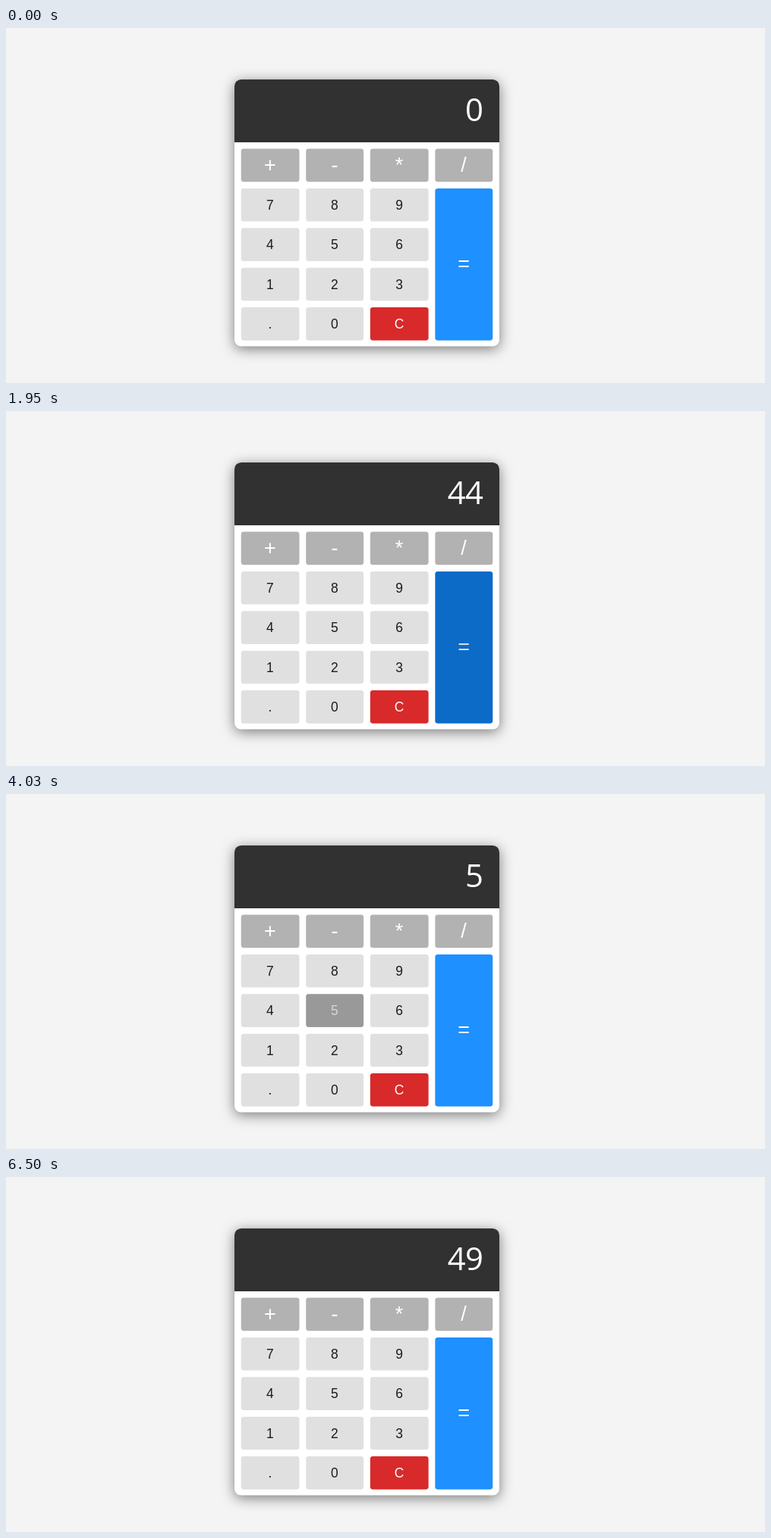
An HTML page that plays this animation: 1000x469 px, repeating every 8 s.

```html
<!DOCTYPE html>
<html lang="en">
<head>
<meta charset="utf-8">
<title>Calculator</title>
<style>
html, body { margin: 0; width: 100%; height: 100%; overflow: hidden; background: #f4f4f4; }
.calc {
  position: absolute; left: 301px; top: 68px; width: 400px; height: 404px;
  transform: scale(.8725); transform-origin: 0 0;
  background: #fff; border-radius: 10px;
  box-shadow: 0 4px 20px rgba(0, 0, 0, .5);
}
.screen {
  box-sizing: border-box; height: 95px; padding-right: 25px;
  background: #313131; color: #fff; border-radius: 10px 10px 0 0;
  font: 48px/90px "Open Sans", "Noto Sans", sans-serif;
  letter-spacing: -.9px; text-align: right;
}
.keys {
  display: grid; gap: 10px; padding: 10px;
  grid-template-columns: repeat(4, 87.5px); grid-auto-rows: 50px;
}
.key {
  display: flex; align-items: center; justify-content: center;
  border-radius: 4px; background: #e0e0e0; color: #1c1c1c;
  font: 20px "Liberation Sans", Arial, sans-serif;
}
.op { background: #b2b2b2; color: #fff; font-size: 31px; }
.clear { background: #d82a2a; color: #fff; }
.equal { grid-column: 4; grid-row: 2 / span 4; background: #1e90ff; color: #fff; font-size: 31px; }
.key.hover { background: #999; color: #d6d6d6; }
.op.hover { background: #808080; color: #d9d9d9; }
.equal.hover { background: #0d6bc8; color: #d9dfe6; }
.clear.hover { background: #a82020; color: #ddd; }
.press { transform: translateY(2px); }
</style>
</head>
<body>
<div class="calc">
  <div class="screen">0</div>
  <div class="keys"></div>
</div>
<script>
const LOOP = 8000;

// time, screen text, key under the pointer, pressed
const steps = [
  [0, "0", ""],
  [260, "0", "2"],
  [390, "0", "1"],
  [650, "0", "4"],
  [1300, "0", "4", true],
  [1430, "4", "4"],
  [1560, "4", "4", true],
  [1690, "44", "4"],
  [1820, "44", "6"],
  [1950, "44", "="],
  [2340, "44", "9"],
  [2470, "44", "-"],
  [2600, "44", "+"],
  [2860, "44", "+", true],
  [3120, "44", "+"],
  [3250, "44", "7"],
  [3640, "44", "5"],
  [3770, "44", "5", true],
  [4030, "5", "5"],
  [4290, "5", "6"],
  [4420, "5", "="],
  [5070, "5", "=", true],
  [5330, "49", "="],
  [6500, "49", ""]
];

const screen = document.querySelector(".screen");
const pad = document.querySelector(".keys");
const kind = c => "+-*/".includes(c) ? "op" : c === "=" ? "equal" : c === "C" ? "clear" : "";

const keys = [..."+-*/789=456123.0C"].map(label => {
  const el = document.createElement("div");
  el.className = "key " + kind(label);
  el.textContent = label;
  pad.append(el);
  return { label, el };
});

let shown = null;
function show(step) {
  if (step === shown) return;
  shown = step;
  const [, text, over, down = false] = step;
  screen.textContent = text;
  for (const { label, el } of keys) {
    el.classList.toggle("hover", label === over);
    el.classList.toggle("press", label === over && down);
  }
}

const start = performance.now();
function tick(now) {
  const t = Math.max(0, now - start) % LOOP;
  show(steps.findLast(s => s[0] <= t));
  requestAnimationFrame(tick);
}
show(steps[0]);
requestAnimationFrame(tick);
</script>
</body>
</html>
```
